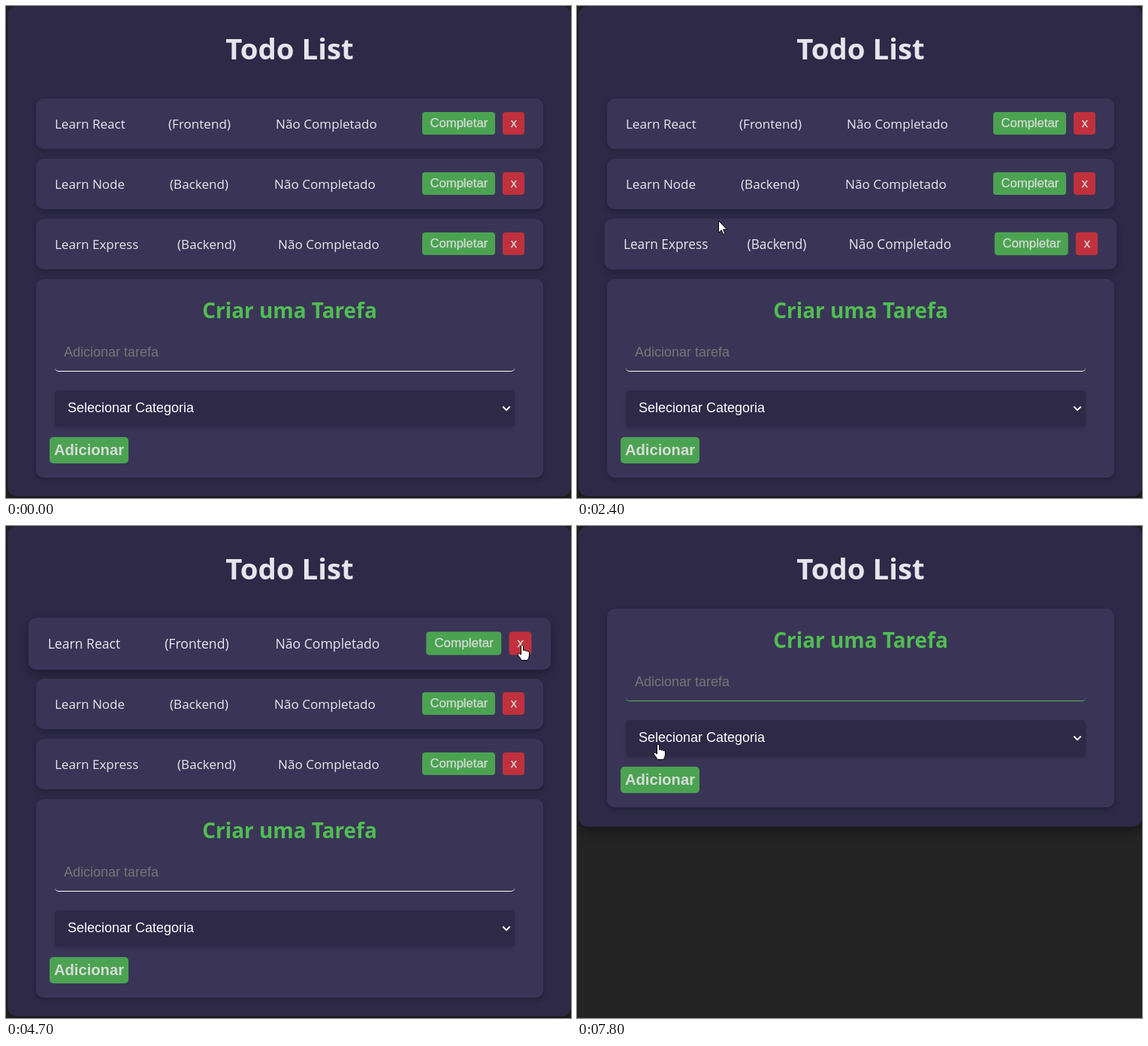
Animation of 752 by 654 pixels, one loop 8 s. Source, as an HTML page:

```html
<!DOCTYPE html>
<html lang="pt">
<head>
<meta charset="utf-8">
<title>Todo List</title>
<style>
  html, body { margin: 0; width: 100%; height: 100%; overflow: hidden; background: #242424; }
  body { position: relative; font: 17.1px "Open Sans", sans-serif; color: #e9e7ef; }
  div, span, h1, h2, svg { position: absolute; margin: 0; box-sizing: border-box; white-space: nowrap; }
  h1, h2 { left: 0; width: 675px; text-align: center; font-family: "Open Sans", sans-serif; font-weight: 700; }
  h1 { left: 40px; top: 0; font-size: 38.4px; line-height: 113px; color: #e6e4ec; }
  h2 { top: 0; font-size: 27.9px; line-height: 83px; color: #50bd52; }
  #panel { left: 2px; top: 0; width: 750px; border-radius: 13px; background: #2d2947; box-shadow: 0 4px 16px rgba(0,0,0,.5); }
  .card { left: 40px; width: 675px; border-radius: 10px; background: #3a3556; box-shadow: 0 3px 6px rgba(0,0,0,.22); }
  .row { height: 67px; line-height: 67px; }
  .button { border-radius: 4px; background: #4ba352; color: #d6dcd6; text-align: center;
    font-family: "Liberation Sans", Arial, sans-serif; font-size: 16.6px; top: 18px; height: 30px; line-height: 29px; }
  .row .button { -webkit-text-stroke: .25px; }
  .done { left: 514.4px; width: 97px; }
  .remove { left: 621.4px; width: 29px; background: #c0313d; }
  #form { height: 264px; font: 18px "Liberation Sans", Arial, sans-serif; }
  #input { left: 25px; top: 73px; width: 612px; height: 50px; line-height: 49px; padding-left: 12px;
    color: #757575; border-bottom: 1px solid #fff; border-radius: 5px; }
  #caret { left: 37px; top: 88px; width: 1px; height: 20px; background: #fff; }
  #select { left: 25px; top: 148px; width: 612px; height: 48px; line-height: 46px; padding-left: 17px;
    color: #fff; background: #2d2947; border-radius: 5px; box-shadow: 0 2px 5px rgba(0,0,0,.2); }
  #select svg { right: 5px; top: 20px; }
  #add { left: 18px; top: 210px; width: 105px; height: 35px; line-height: 34px; border-radius: 5px; font-size: 20.2px; font-weight: 700; }
  #pointer { left: -1px; top: 0; overflow: visible; }
</style>
</head>
<body>
<div id="panel"></div>
<h1>Todo List</h1>
<div id="form" class="card">
  <h2>Criar uma Tarefa</h2>
  <div id="input">Adicionar tarefa</div>
  <div id="caret"></div>
  <div id="select">Selecionar Categoria
    <svg width="12" height="9" fill="none" stroke="#fff" stroke-width="2"><path d="M1.3 1.5L6 6.2L10.7 1.5"/></svg>
  </div>
  <div id="add" class="button">Adicionar</div>
</div>
<svg id="pointer" width="20" height="24" fill="#fff" stroke="#000" stroke-linejoin="round"><path/></svg>
<script>
const LOOP = 8000, STEP = 100, FADE = 300;
const FOCUS = 7150, BLUR_CARET = 7650;
const ROW_TOP = 123.4, ROW_STEP = 80;
const $ = id => document.getElementById(id);

// hovers: [enter, leave] times
const tasks = [
  { name: 'Learn React', kind: '(Frontend)', kindX: 176, stateX: 319, removed: 4800,
    hovers: [[940, 1060], [2560, 2870], [3080, 4800]] },
  { name: 'Learn Node', kind: '(Backend)', kindX: 178, stateX: 317, removed: 6200,
    hovers: [[1090, 1225], [2420, 2500], [4800, 6200]] },
  { name: 'Learn Express', kind: '(Backend)', kindX: 188, stateX: 322, removed: 6500,
    hovers: [[1250, 1390], [2324, 2402], [6200, 6500]] }
];

// pointer path: [time, x, y]
const path = [
  [0, 135, -30], [700, 135, -25], [1000, 140, 160], [1500, 155, 404], [1800, 150, 524],
  [2100, 170, 540], [2500, 195, 200], [2900, 202, 119], [3000, 204, 108], [3250, 215, 150],
  [3800, 300, 158], [4000, 300, 158], [4600, 684, 158], [4700, 686, 158], [4900, 686, 158],
  [5600, 680, 158], [6700, 680, 158], [7100, 125, 205], [7400, 125, 208], [7800, 107, 290], [LOOP, 107, 290]
];

const shapes = {
  arrow: 'M.5.5V16.5L4.2 13L6.6 18.6L9 17.6L6.6 12H11.5Z',
  hand: 'M.5 1.5Q2 -1 3.5 1.5V7.5Q5 5.8 6.3 8Q8 6.8 9 8.8Q11 7.8 11.5 10V14Q11 18 9 20.5H1Q-.5 17 -4 13Q-4 10.5 -1.5 11.5L.5 13Z',
  beam: 'M-2 -8H.5V8H-2V9H4V8H1.5V-8H4V-9H-2Z'
};

for (const task of tasks) {
  const row = task.el = document.createElement('div');
  row.className = 'card row';
  row.innerHTML = `<span style="left:25px">${task.name}</span>
    <span style="left:${task.kindX}px">${task.kind}</span>
    <span style="left:${task.stateX}px">Não Completado</span>
    <div class="button done">Completar</div><div class="button remove">x</div>`;
  document.body.insertBefore(row, $('pointer'));
}

const clamp = v => Math.max(0, Math.min(1, v));
const ease = v => 1 - (1 - clamp(v)) ** 2.4 * (1 + 1.4 * clamp(v));
const inside = (x, y, left, top, right, bottom) => x >= left && x <= right && y >= top && y <= bottom;

function hoverAmount(hovers, t) {
  return Math.max(...hovers.map(([enter, leave]) =>
    ease((Math.min(t, leave) - enter) / FADE) * (1 - ease((t - leave) / FADE))));
}

function pointerAt(t) {
  const i = path.findIndex(p => p[0] > t);
  const [t0, x0, y0] = path[i - 1], [t1, x1, y1] = path[i];
  const k = (t - t0) / (t1 - t0);
  return [x0 + (x1 - x0) * k, y0 + (y1 - y0) * k];
}

function pointerShape(x, y, rows, formY) {
  const fy = y - formY;
  if (inside(x, fy, 65, 73, 677, 123)) return 'beam';
  if (inside(x, fy, 65, 148, 677, 196) || inside(x, fy, 58, 210, 163, 245)) return 'hand';
  const rowY = (y - ROW_TOP) % ROW_STEP;
  const overButton = y > ROW_TOP && y < ROW_TOP + rows * ROW_STEP && rowY > 17 && rowY < 49 &&
    (x > 558 && x < 660 || x > 669 && x < 700);
  return overButton ? 'hand' : 'arrow';
}

function draw(t) {
  let rows = 0;
  for (const { el, removed, hovers } of tasks) {
    const alive = t < removed;
    el.style.display = alive ? '' : 'none';
    if (!alive) continue;
    const h = hoverAmount(hovers, t);
    el.style.top = ROW_TOP + ROW_STEP * rows++ + 'px';
    el.style.transform = h > 0 ? `scale(${1 + .03 * h})` : 'none';
    el.style.boxShadow = `0 ${3 + 2 * h}px ${6 + 6 * h}px rgba(0,0,0,${.22 + .08 * h})`;
  }
  const formY = rows ? 123 + ROW_STEP * rows : 110;
  $('form').style.top = formY + 'px';
  $('panel').style.height = formY + (rows ? 289 : 290) + 'px';
  $('input').style.borderColor = t >= FOCUS ? '#50bd52' : '#fff';
  $('caret').style.display = t >= FOCUS && t < BLUR_CARET ? '' : 'none';

  const [x, y] = pointerAt(t);
  $('pointer').style.transform = `translate(${Math.round(x)}px,${Math.round(y)}px)`;
  $('pointer').firstChild.setAttribute('d', shapes[pointerShape(x, y, rows, formY)]);
}

function tick() {
  const t = performance.now() % LOOP;
  draw(Math.floor(t / STEP) * STEP);
  requestAnimationFrame(tick);
}
tick();
</script>
</body>
</html>
```
